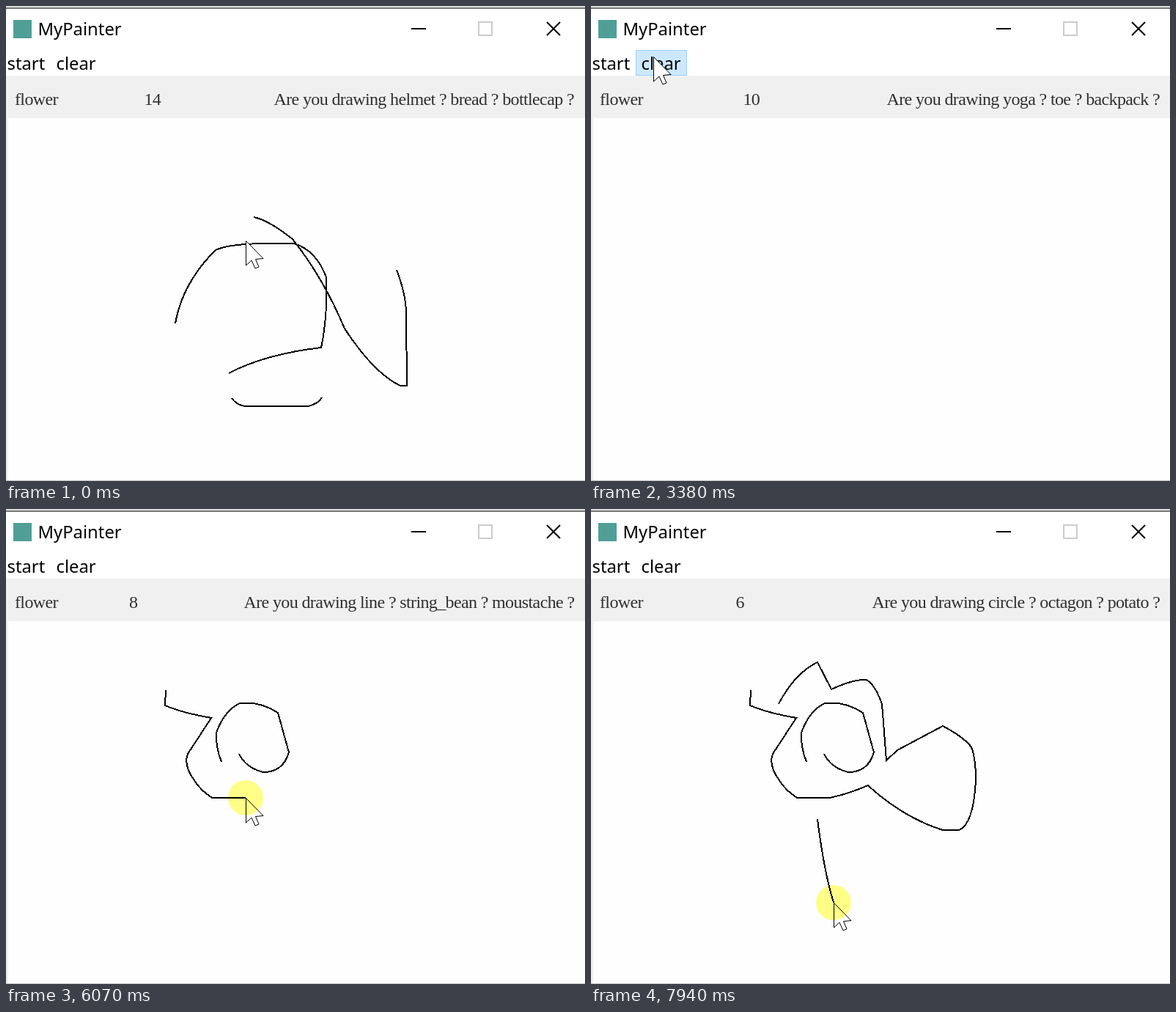
Write an HTML page that moves like this. It is 790 px wide and 648 px high and loops after 8000 ms.

```html
<!DOCTYPE html>
<html lang="en">
<head>
<meta charset="utf-8">
<title>MyPainter</title>
<style>
  html, body { margin: 0; width: 100%; height: 100%; overflow: hidden; background: #fff; }
  svg { display: block; width: 100%; height: 100%; }
  .ui { font: 23.8px "Noto Sans", "Open Sans", sans-serif; }
  .row { font: 24px "Liberation Serif", "Noto Serif", serif; letter-spacing: -.63px; fill: #303030; }
  .ink { fill: none; stroke: #000; stroke-width: 2; shape-rendering: crispEdges; }
  #halo { fill: #ffff88; mix-blend-mode: multiply; }
</style>
</head>
<body>
<svg viewBox="0 0 790 648" xmlns="http://www.w3.org/2000/svg">
  <rect width="790" height="648" fill="#fff"/>
  <rect width="790" height="2" fill="#dcdcdc"/>
  <rect y="2" width="790" height="2" fill="#777"/>
  <rect x="10" y="19" width="25" height="25" fill="#4f9f97"/>
  <text class="ui" x="43.5" y="40">MyPainter</text>
  <g fill="none" stroke="#000" stroke-width="2">
    <path d="M553 31H573"/>
    <path d="M645 22H663V40H645Z" stroke="#ccc"/>
    <path d="M738 22L756 40M756 22L738 40"/>
  </g>
  <rect id="hover" x="61.5" y="60.5" width="69" height="34" fill="#cce8ff" stroke="#99d1ff"/>
  <text class="ui" x="1.5" y="87">start</text>
  <text class="ui" x="68.5" y="87">clear</text>
  <rect y="95" width="790" height="553" fill="#f0f0f0"/>
  <rect x="3" y="153" width="787" height="494" fill="#fefefe"/>
  <rect y="647" width="790" height="1" fill="#c4c4c4"/>
  <text class="row" x="12" y="135">flower</text>
  <text class="row" id="count" y="135"></text>
  <text class="row" id="guess" y="135"></text>
  <g class="ink" id="before">
    <path d="M231 433Q241 377 286 333 302 325 350 324H393Q423 333 437 370V410Q435 444 430 466 353 475 304 501"/>
    <path d="M338 288Q358 292 391 318 433 371 462 440 502 501 538 518H547L546 420Q546 394 533 360"/>
    <path d="M308 535Q315 545 327 546H412Q426 543 431 534"/>
  </g>
  <g class="ink" id="strokes"></g>
  <path id="arrow" d="M.5 .5V34L8 27 13 38 18 36 13.500 25.500 24 24.500Z" fill="#fff" stroke="#000"/>
  <circle id="halo" r="24"/>
</svg>
<script>
const LOOP = 8000, CLEAR = 3220, REST = "h0";
const $ = id => document.getElementById(id);
const show = (el, on) => el.style.display = on ? "" : "none";

// The hand's actions in turn: end time, kind, path from where the last one ended
const script = [
  [90, "move", REST],
  [490, "move", "Q235 250 155 265"],
  [900, "draw", "Q149 323 156 381"],
  [1500, "move", "C260 420 300 520 206 532"],
  [1660, "move", "Q196 475 202 411"],
  [2520, "move", "Q215 320 290 219"],
  [3020, "move", "Q200 110 85 69"],
  [CLEAR, "press", REST],
  [3480, "move", REST],
  [4250, "move", "C150 130 265 260 294 345"],
  [5190, "draw", "Q286 325 287 305 298 275 319 265 347 262 371 278L386 332Q378 359 351 359 327 353 318 334"],
  [5440, "move", "Q260 270 218 247"],
  [6070, "draw", "L217 268Q240 278 280 285L252 328Q235 348 268 384L281 394H326"],
  [7220, "draw", "Q350 389 378 377L388 386Q432 423 480 438H502Q522 430 525 370 525 340 519 325 510 312 480 296L418 329 403 343 397 266Q388 240 376 233 358 232 328 246L309 209Q278 224 256 266"],
  [7300, "press", REST],
  [7620, "move", "C330 275 385 370 309 423"],
  [7940, "draw", "Q318 495 331 537"]
];

let at = { x: 327, y: 320 }, from = 0;
const acts = script.map(([to, kind, d]) => {
  const el = document.createElementNS("http://www.w3.org/2000/svg", "path");
  el.setAttribute("d", `M${at.x} ${at.y}${d}`);
  if (kind === "draw") $("strokes").append(el);
  const len = el.getTotalLength();
  const act = { from, to, kind, el, len };
  if (len) at = el.getPointAtLength(len);
  from = to;
  return act;
});

// The hand slows towards the end of each action
const ease = k => k * (1.4 - .4 * k);
const clamp = k => Math.min(1, Math.max(0, k));
const progress = (a, t) => a.len * ease(clamp((t - a.from) / (a.to - a.from)));

const guesses = [
  [366, "helmet ? bread ? bottlecap"],
  [428, "yoga ? toe ? helmet"],
  [404, "yoga ? toe ? backpack"],
  [325, "line ? string_bean ? moustache"],
  [384, "circle ? octagon ? potato"]
];

function drawHand(t) {
  const act = acts.find(a => t < a.to) || acts.at(-1);
  const spot = act.el.getPointAtLength(progress(act, t));
  for (const id of ["arrow", "halo"])
    $(id).setAttribute("transform", `translate(${Math.round(spot.x)} ${Math.round(spot.y)})`);
  show($("halo"), act.kind !== "move");
  show($("hover"), t > 2940 && t < 3540);
}

function drawInk(t) {
  show($("before"), t < CLEAR);
  for (const a of acts.filter(a => a.kind === "draw")) {
    const done = progress(a, t);
    show(a.el, done > 0 && (a.from > CLEAR || t < CLEAR));
    a.el.style.strokeDasharray = done < a.len ? `${done} 9999` : "none";
  }
}

// The count drops each second; every second drop brings a new guess
function drawText(t) {
  const drops = Math.floor((t + 630) / 1000);
  const [x, words] = guesses[Math.ceil(drops / 2)];
  $("count").textContent = 14 - drops;
  $("count").setAttribute("x", x / 2 + 5.5);
  $("guess").textContent = `Are you drawing ${words} ?`;
  $("guess").setAttribute("x", x - .5);
}

const start = performance.now();
function frame() {
  const t = Math.max(0, performance.now() - start) % LOOP;
  drawHand(t);
  drawInk(t);
  drawText(t);
  requestAnimationFrame(frame);
}
frame();
</script>
</body>
</html>
```
